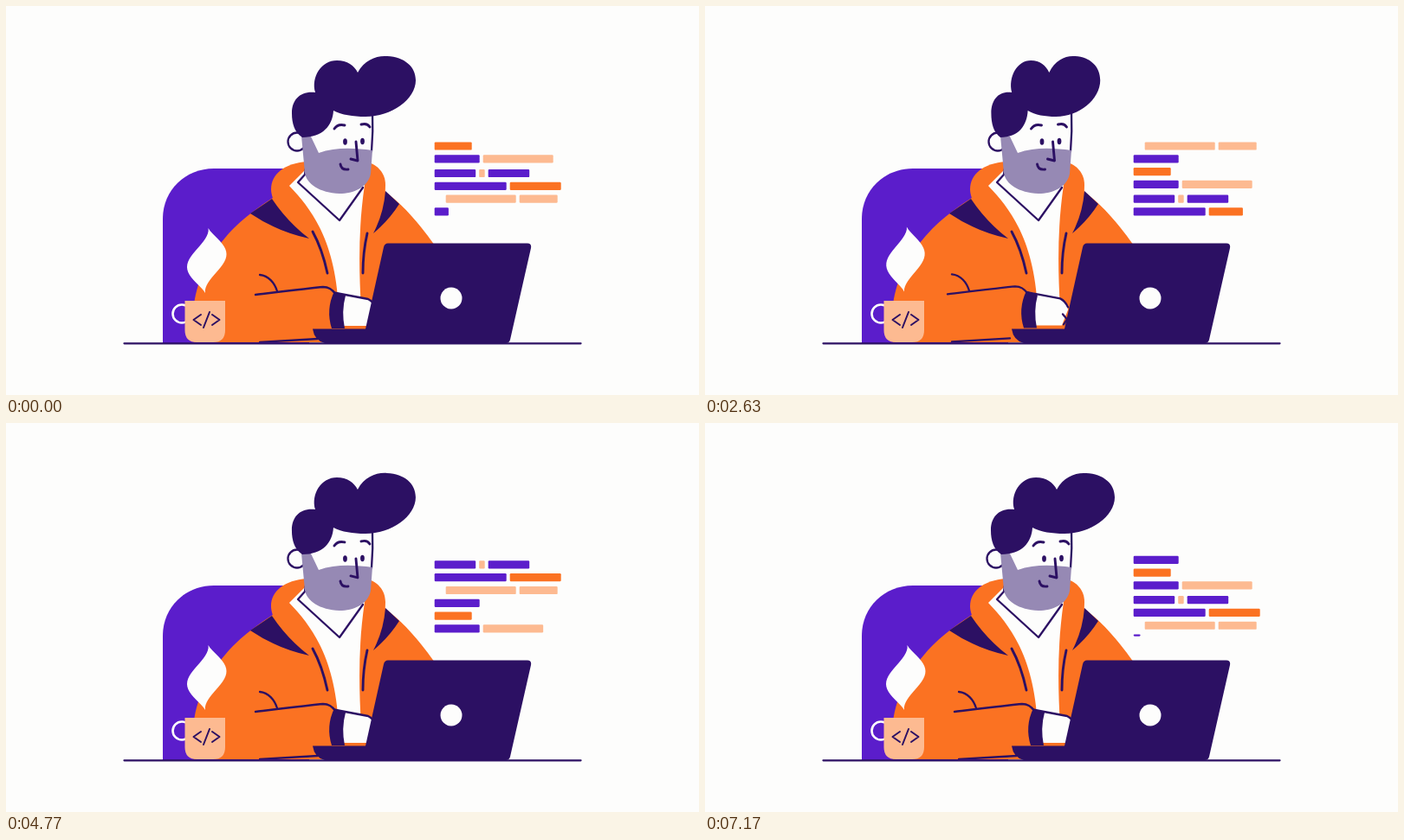
These frames come from a looping animation (800x450 px, 7210 ms). An HTML page:

```html
<!DOCTYPE html>
<html lang="en">
<head>
<meta charset="utf-8">
<title>Coder at a desk</title>
<style>
  html, body { margin: 0; width: 100%; height: 100%; overflow: hidden; background: #fdfdfc; }
  svg { display: block; width: 100vw; height: 100vh; }
  .white { fill: #fdfdfc; }
  .navy { fill: #2c1063; }
  .purple { fill: #5b1dcb; }
  .orange { fill: #fb7222; }
  .light { fill: #fdba91; }
  .beard { fill: #9689b4; }
  .line { fill: none; stroke: #2c1063; stroke-width: 2.3; stroke-linecap: round; stroke-linejoin: round; }
  .bold { stroke-width: 2.9; }
  .thin { stroke-width: 2; }
  .ring { fill: none; stroke: #fdfdfc; stroke-width: 2.6; }
</style>
</head>
<body>
<svg viewBox="0 0 800 450">
  <clipPath id="desk"><rect width="800" height="389"/></clipPath>
  <path class="purple" d="M181 390V246C181 213 207 188 240 188H350V390Z"/>
  <g id="code"></g>

  <g clip-path="url(#desk)">
    <path class="orange" d="M217 415V345L262 300L430 209C455 226 476 250 495 277V415Z"/>
    <g id="torso">
      <path class="orange" d="M217 415V345C221 314 238 283 262 258C280 240 300 227 320 214L430 209C453 226 475 248 493 277V415Z"/>
      <path class="orange" d="M347 180C322 182 306 194 306 212C306 228 325 255 350 268L420 265C432 250 438 230 438 207C438 192 428 184 417 180Z"/>
      <path class="white" d="M347 188L327 208C356 238 380 275 384 350H410C407 300 407 255 414 207L400 192Z"/>
      <path class="navy" d="M307 223L282 240Q313 261 350 269Q325 250 307 223ZM438 214L454 229Q442 248 424 263Q436 240 438 214Z"/>
      <path class="line" d="M346 188L345 195L337 204L385 248L412 210"/>
      <path class="line bold" d="M354 261Q365 281 371 309M417 263Q412 285 412 309"/>
    </g>
    <g id="arm">
      <path class="orange" d="M300 333Q350 326 366 325Q377 325 381 333L378 400H300Z"/>
      <path class="white" d="M386 332L418 339Q427 343 427 352L420 370H386Z"/>
      <path class="line" d="M381 332L418 339Q424 342 427 349M421 357L426 363L422 369"/>
      <path class="navy" d="M379 330L392 335Q387 353 391 373H376Q369 351 379 330Z"/>
      <path class="line" d="M293 311C303 312 310 320 313 330M288 334C330 329 355 326 366 325Q375 325 380 333M293 389L360 385"/>
    </g>
  </g>

  <g id="head">
    <g id="ear"><circle class="white" cx="336" cy="157" r="10.5"/><circle class="line" cx="336" cy="157" r="10.5"/></g>
    <path class="white" d="M342 140L380 110H423L421 185H350Z"/>
    <path class="line" d="M423 122Q424 145 422 168"/>
    <path class="beard" d="M341 150L352 151L361 170C380 163 402 164 423 167L421 194C418 210 401 217 385 217C362 216 347 206 345 193Z"/>
    <g id="face">
      <ellipse class="navy" cx="391.5" cy="157" rx="2.4" ry="3.7"/>
      <ellipse class="navy" cx="411.5" cy="156.5" rx="2.4" ry="3.7"/>
      <path class="line bold" d="M379 142Q383 136 391 138M410 137Q417 135 420 140M404 157L406 179L398 177M386 183Q387 190 395 189"/>
    </g>
    <path id="hair" class="navy" d="M342 152C333 146 330 136 330 124C330 108 340 98 357 100C352 82 364 63 382 63C394 63 402 69 406 77C414 62 428 57 440 58C460 59 473 70 473 86C473 108 445 128 415 128C400 128 388 126 378 121C377 138 366 152 342 152Z"/>
  </g>

  <path class="navy" d="M441 274.5H602Q607 274.5 606 280L582 386Q581 390 577 390H368Q356 387 354 373.5H415L436 279Q437 274.5 441 274.5Z"/>
  <circle class="white" cx="514" cy="338" r="12.5"/>
  <path class="line" d="M136.5 390.300H663.5"/>

  <path id="steam" class="white"/>
  <circle class="ring" cx="203" cy="356" r="10.5"/>
  <path class="light" d="M206.5 341H253V375Q253 389 239 389H220.5Q206.5 389 206.5 375Z"/>
  <path class="line thin" d="M225 357L216.5 363L225 369M235 354L228 372M238 357L246.5 363L238 369"/>
</svg>
<script>
const LOOP = 7210;
const $ = id => document.getElementById(id);
const ramp = (t, from, to) => {
  const p = Math.min(1, Math.max(0, (t - from) / (to - from)));
  return p * p * (3 - 2 * p);
};
const bump = (t, centre, width) => Math.exp(-(((t - centre) / width) ** 2));

// Each code line: indent, then bars as colour and width
const GAP = 4, REST = 13.5;
const lines = [
  [0, ['purple', 52]],
  [0, ['orange', 43]],
  [0, ['purple', 52], ['light', 81]],
  [0, ['purple', 47.5], ['light', 6.5], ['purple', 47.5]],
  [0, ['purple', 83], ['orange', 59]],
  [13, ['light', 81], ['light', 44]]
];

// The typist rests after every bar, so a bar costs its width plus REST
let total = 0;
const rows = lines.map(([indent, ...bars]) => {
  const row = { start: total, drop: bars.length > 2 ? 16.7 : 14.8 };
  let x = 494.7 + indent;
  row.bars = bars.map(([colour, w]) => {
    const bar = { colour, w, x, start: total };
    x += w + GAP;
    total += w + REST;
    return bar;
  });
  return row;
});

function drawCode(t) {
  const typed = (t / LOOP * 2 * total + 16) % total;
  const current = rows.filter(r => r.start <= typed).length - 1;
  const scroll = Math.min(1, (typed - rows[current].start) / 16) ** 2;
  const count = scroll < 1 ? 7 : 6;
  let y = 233.3 + rows[current].drop * (1 - scroll);
  let out = '';
  for (let j = 0; j < count; j++) {
    const row = rows[(current - j + 6) % 6];
    for (const { colour, w, x, start } of row.bars) {
      const shown = j ? w : Math.min(w, typed - start);
      if (shown > 0) out += `<rect class="${colour}" x="${x}" y="${y}" width="${shown}" height="${j ? 9.2 : 9.2 * scroll}" rx="1.2"/>`;
    }
    y -= row.drop;
  }
  $('code').innerHTML = out;
}

// A spindle whose centre line sways from side to side
function drawSteam(t) {
  const sway = Math.cos(t / LOOP * 6 * Math.PI);
  const top = 252.5 + 4.5 * sway * sway;
  const left = [], right = [];
  for (let v = 0; v <= 1.001; v += 0.04) {
    const x = 230 + sway * (5 * Math.sin(2 * Math.PI * v) + 3.5 * (1 - v));
    const half = 21 * Math.abs(Math.sin(Math.PI * v)) ** 1.5;
    const y = top + 75 * v;
    left.push([x - half, y]);
    right.unshift([x + half, y]);
  }
  $('steam').setAttribute('d', `M${left.concat(right).join('L')}Z`);
}

function drawBody(t) {
  const tilt = 14 * bump(t, 3560, 260) - 14 * bump(t, 4100, 270) - 2.5 * bump(t, 1100, 300);
  const back = Math.min(0, tilt);
  const turn = ramp(t, 0, 650) - ramp(t, 2900, 3400);
  const beat = t / 75;
  const move = (id, value) => $(id).setAttribute('transform', value);
  move('head', `translate(${back * 0.5} ${back * 0.3}) rotate(${tilt} 338 200)`);
  move('torso', `translate(0 ${tilt * 0.25}) rotate(${tilt * 0.2} 360 390)`);
  move('hair', `translate(${40 * turn} 0) scale(${1 - 0.12 * turn} 1)`);
  move('face', `translate(${-2.5 * turn} 0)`);
  move('ear', `translate(${2 * turn} 0)`);
  move('arm', `translate(${turn * (Math.sin(beat) - 7.5)} ${turn * 0.7 * Math.cos(beat)})`);
}

const begin = performance.now();
function frame() {
  const t = (performance.now() - begin) % LOOP;
  drawCode(t);
  drawSteam(t);
  drawBody(t);
  requestAnimationFrame(frame);
}
frame();
</script>
</body>
</html>
```
